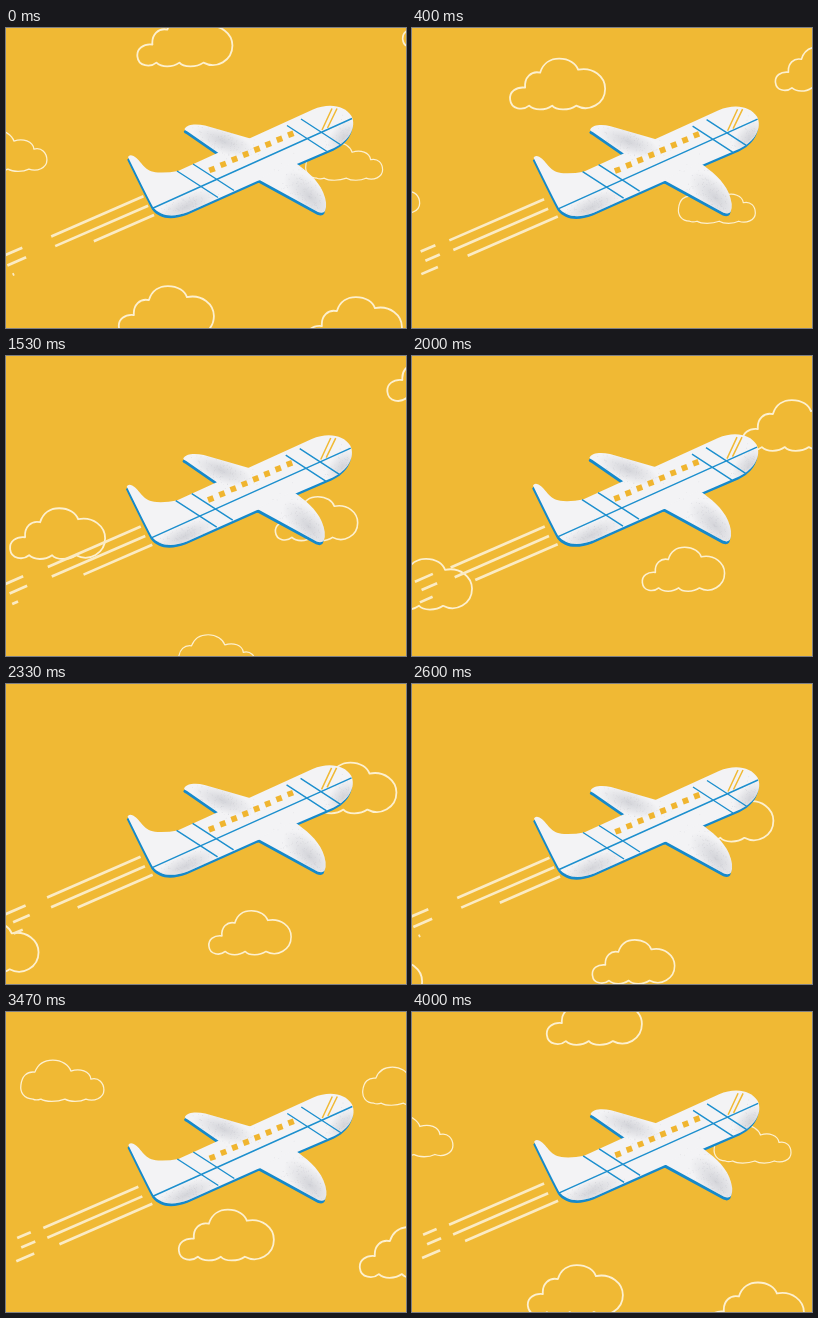
An HTML page for the animation above (4.07 s loop, 400 by 300 pixels).

```html
<!DOCTYPE html>
<html lang="en">
<head>
<meta charset="utf-8">
<title>Plane in the clouds</title>
<style>
  html, body { margin: 0; width: 100%; height: 100%; overflow: hidden; background: #f0b934; }
  svg { display: block; width: 100vw; height: 100vh; }
  .cloud { fill: none; stroke: #fdf0cf; stroke-linejoin: round; vector-effect: non-scaling-stroke; }
  .streak { stroke: #fbebc4; stroke-width: 2.7; }
  .lines { fill: none; stroke: #1c8fce; stroke-width: 1.4; }
</style>
</head>
<body>
<svg viewBox="0 0 400 300" preserveAspectRatio="none">
  <defs>
    <path id="upperWing" d="M178.500 101 C181 96 190 95.500 199 97.500 L246 111 L214 126 L181.500 103.500 Q178.500 102 178.500 101Z"/>
    <path id="body" d="M122 129 Q123.500 126 127.500 128 C136 133 138 144 152 144.500 Q162 145 172 143 L307 81.500 C323 74.500 339 77.500 345.500 88 C351 99 343 113 328 120 L253 152.300 L182 184 C166 190 154 188 147 179 Q143 172 122 129Z"/>
    <path id="lowerWing" d="M250 152.300 L288 134 C300 142 312 152 317 164 Q322 176 319 183 Q317 186 312 184 L254 152.300Z"/>
    <clipPath id="planeShape">
      <use href="#upperWing"/><use href="#body"/><use href="#lowerWing"/>
    </clipPath>
    <radialGradient id="shade">
      <stop offset="0" stop-color="#c9cad0" stop-opacity=".75"/>
      <stop offset="1" stop-color="#c9cad0" stop-opacity="0"/>
    </radialGradient>
  </defs>
  <rect width="400" height="300" fill="#f0b934"/>
  <g id="clouds"></g>
  <g id="plane">
    <g id="streaks"></g>
    <g fill="#1589cb" transform="translate(-.8 2.800)">
      <use href="#upperWing"/><use href="#body"/><use href="#lowerWing"/>
    </g>
    <g fill="#f3f3f5">
      <use href="#upperWing"/><use href="#body"/><use href="#lowerWing"/>
    </g>
    <g id="grain" clip-path="url(#planeShape)" fill="#b9bac2"></g>
    <path class="lines" d="M146 180.500 L346 90.500 M171 143 L212 169.500 M187 136 L228 162.500 M281 97.500 L321 123.500 M295 91 L335 117"/>
    <path d="M326 80.500 L316 102 M331 80.500 L321.500 100" stroke="#f0b934" stroke-width="1.5"/>
    <g id="windows" fill="#f0b52f"></g>
  </g>
</svg>
<script>
const LOOP = 4070;
const byId = id => document.getElementById(id);

function add(parent, tag, attrs) {
  const el = document.createElementNS('http://www.w3.org/2000/svg', tag);
  for (const key in attrs) el.setAttribute(key, attrs[key]);
  return parent.appendChild(el);
}

const TALL = 'M20 47 C14 52 2 51 1 41 C0 33 7 28 16 29 C15 19 22 12 31 14 C34 4 42 0 50 0 C60 0 67 5 69 11 ' +
  'C84 8 96 18 96 30 C96 45 80 54 67 47 C60 52 47 52 43 47 C36 52 25 52 20 47Z';
const FLAT = 'M13 39 C4 39 0 32 1 25 C2 16 7 11 15 12 C18 4 25 0 33 0 C42 0 49 5 51 11 C60 8 70 11 71 19 ' +
  'C79 17 84 23 84 30 C84 38 74 42 66 39 C60 42 50 42 45 39 C37 42 26 42 21 39 C18 40 15 40 13 39Z';

// Position x, y at time t0 (s); EARLY and LATE are drift speeds in px/s.
const EARLY = [-83.2, 107.6], LATE = [-107.5, 104.5];
const clouds = [
  { shape: TALL, x: 130.5, y: -12.5, t0: 0, v: EARLY, until: 3 },
  { shape: TALL, x: 112, y: 258, t0: 0, v: EARLY, until: 1 },
  { shape: TALL, x: 300, y: 269, t0: 0, v: EARLY, until: 1 },
  { shape: FLAT, x: 299, y: 114, t0: 0, v: EARLY, until: 2.5, size: .925, line: 1.2 },
  { shape: TALL, x: 396, y: -24, t0: 0, v: EARLY, until: 3.3, size: .865, line: 1.6 },
  { shape: FLAT, x: -43, y: 102, t0: 0, v: EARLY, until: 1, line: 1.3 },
  { shape: TALL, x: 330, y: 44, t0: 2, v: LATE, from: 1.2 },
  { shape: FLAT, x: 14, y: 48, t0: 3.47, v: LATE, from: 2.65, line: 1.3 },
  { shape: FLAT, x: 356, y: 55, t0: 3.47, v: [-103, 109], from: 2.65, size: .925, line: 1.2 },
  { shape: TALL, x: 353, y: 215, t0: 3.47, v: LATE, from: 2.65 },
  { shape: TALL, x: 134, y: -18, t0: 4, v: LATE, from: 3.4 }
];
for (const c of clouds) {
  c.el = add(byId('clouds'), 'path', { class: 'cloud', d: c.shape, 'stroke-width': c.line || 1.8 });
}

// Each streak: left end, its swing, right end, its swing, and y at the left end.
const streaks = [
  [37, 12, 132, 8, 212], [41, 12, 136, 9, 221.7], [53, 51, 146, 3, 228.3],
  [11, -32, 24.5, -12, 222], [15, -20, 29, -13, 231.5], [10, -5, 28, -29, 245.3]
].map(([left, leftSwing, right, rightSwing, y]) => ({
  left, leftSwing, right, rightSwing, y,
  el: add(byId('streaks'), 'line', { class: 'streak' })
}));

for (let i = 0; i < 8; i++) {
  add(byId('windows'), 'rect', {
    x: -2.9, y: -2.9, width: 5.8, height: 5.8,
    transform: `translate(${206 + i * 11.25} ${141.4 - i * 5.03}) rotate(-20)`
  });
}

let seed = 7;
const random = () => (seed = seed * 16807 % 2147483647) / 2147483647;
const spread = () => random() + random() + random() - 1.5;

// Soft grey patch with fine grain on top.
function shadePatch(x, y, rx, ry, angle, count) {
  const group = add(byId('grain'), 'g', { transform: `translate(${x} ${y}) rotate(${angle})` });
  add(group, 'ellipse', { rx, ry, fill: 'url(#shade)' });
  for (let i = 0; i < count; i++) {
    add(group, 'circle', { cx: spread() * rx, cy: spread() * ry, r: .3 + random() * .2, opacity: .35 });
  }
}
shadePatch(304, 169, 34, 15, 45, 200);
shadePatch(217, 113, 32, 12, 20, 150);
shadePatch(180, 179, 34, 12, -24, 150);
shadePatch(338, 109, 20, 13, -45, 90);

// Time (s), x and y of the plane's gentle bobbing.
const bob = [[0, 0, 0], [.4, -.4, .7], [1, -1.6, 2.7], [2, -1, .6], [2.6, 0, 5.5], [3.47, .3, 4], [4, .1, .8], [4.07, 0, .5]];

function bobAt(t) {
  const i = Math.max(1, bob.findIndex(k => k[0] >= t));
  const a = bob[i - 1], b = bob[i];
  const p = (t - a[0]) / (b[0] - a[0]);
  const e = p * p * (3 - 2 * p);
  return [a[1] + (b[1] - a[1]) * e, a[2] + (b[2] - a[2]) * e];
}

function draw(ms) {
  const t = ms / 1000;
  for (const c of clouds) {
    const visible = t >= (c.from || 0) && t < (c.until || 5);
    const x = c.x + c.v[0] * (t - c.t0), y = c.y + c.v[1] * (t - c.t0);
    c.el.setAttribute('visibility', visible ? 'visible' : 'hidden');
    c.el.setAttribute('transform', `translate(${x} ${y}) scale(${c.size || 1})`);
  }

  byId('plane').setAttribute('transform', `translate(${bobAt(t).join(' ')})`);

  const swing = (1 - Math.cos(2 * Math.PI * (ms - 360) / 520)) / 2;
  for (const s of streaks) {
    const x1 = s.left + s.leftSwing * swing;
    const x2 = Math.max(x1, s.right + s.rightSwing * swing);
    const yAt = x => s.y - .435 * (x - s.left);
    s.el.setAttribute('x1', x1);
    s.el.setAttribute('y1', yAt(x1));
    s.el.setAttribute('x2', x2);
    s.el.setAttribute('y2', yAt(x2));
  }
}

const start = performance.now();
function tick() {
  draw((performance.now() - start) % LOOP);
  requestAnimationFrame(tick);
}
draw(0);
requestAnimationFrame(tick);
</script>
</body>
</html>
```
